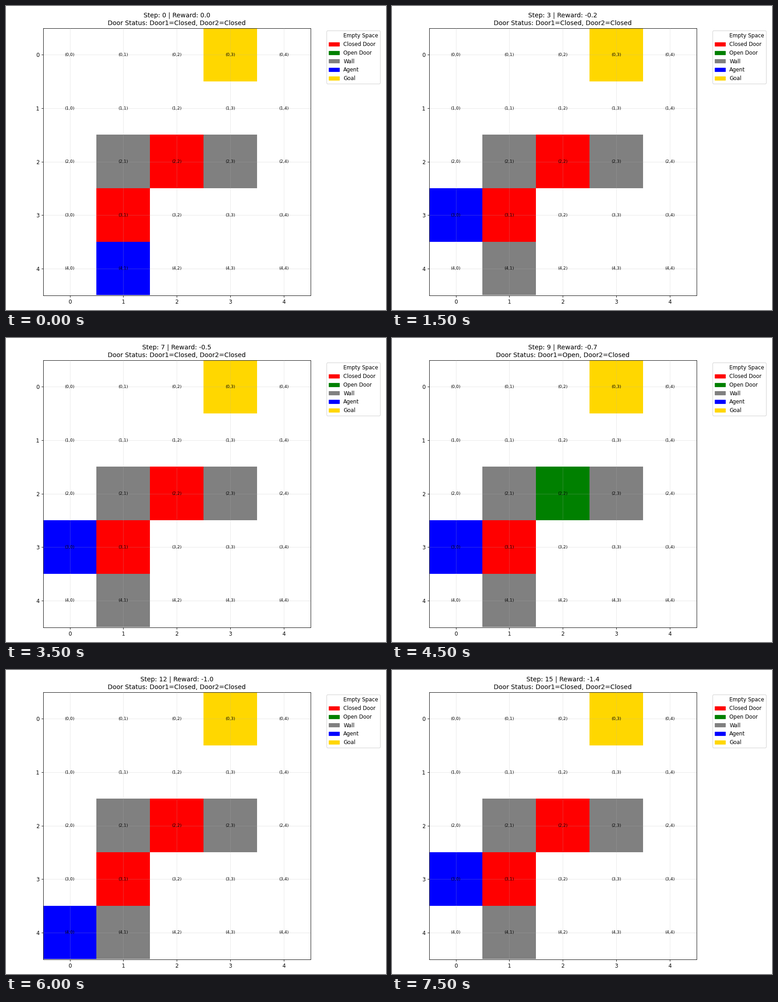
Animation, 837 px wide and 669 px high, one loop 8 s. Source, as a matplotlib script:

```python
import matplotlib.pyplot as plt
from matplotlib.animation import FuncAnimation
from matplotlib.patches import Patch, Rectangle
from matplotlib.transforms import IdentityTransform

W, H, DPI = 837, 669, 83.7
N = 5
COL_EDGES = [82, 199, 317, 435, 553, 671]
ROW_EDGES = [48, 166, 283, 401, 519, 636]

WALLS = {(2, 1), (2, 3), (4, 1)}
GOAL = (0, 3)
DOOR1, DOOR2 = (2, 2), (3, 1)

# One entry per step
PATH = ([(4, 1), (3, 1)] + [(3, 0)] * 4 + [(4, 0), (3, 0), (2, 0), (3, 0)]
        + [(4, 0)] * 3 + [(3, 0)] * 3)
REWARDS = [0.0, -0.1, -0.2, -0.2, -0.3, -0.3, -0.4, -0.5,
           -0.6, -0.7, -0.8, -0.9, -1.0, -1.1, -1.2, -1.4]
DOOR1_OPEN = {5, 8, 9, 11}
DOOR2_OPEN = {1, 2, 10, 13}

LEGEND = [("white", "Empty Space"), ("red", "Closed Door"),
          ("green", "Open Door"), ("gray", "Wall"),
          ("blue", "Agent"), ("gold", "Goal")]

# The tiny surplus keeps the pixel size from rounding down
fig = plt.figure(figsize=(10.0001, 7.9931), dpi=DPI, facecolor="white")
ax = fig.add_axes([81.65 / W, 32.4 / H, 589 / W, 588 / H])
ax.set(xlim=(-0.5, N - 0.5), ylim=(N - 0.5, -0.5),
       xticks=range(N), yticks=range(N))
ax.grid(True, alpha=0.3)
ax.set_axisbelow(False)

cells = {}
for r in range(N):
    for c in range(N):
        x, y = COL_EDGES[c], H - ROW_EDGES[r + 1]
        w = COL_EDGES[c + 1] - x
        h = ROW_EDGES[r + 1] - ROW_EDGES[r]
        cells[r, c] = Rectangle((x, y), w, h, lw=0, zorder=0.5,
                                transform=IdentityTransform())
        ax.add_artist(cells[r, c])
        ax.text(c, r, f"({r},{c})", ha="center", va="center",
                fontsize=8, zorder=4)

ax.legend(handles=[Patch(color=col, label=name) for col, name in LEGEND],
          bbox_to_anchor=(1.05, 1), loc="upper left")
title = ax.set_title("")


def cell_color(cell, step):
    if cell == PATH[step]:
        return "blue"
    if cell == DOOR1:
        return "green" if step in DOOR1_OPEN else "red"
    if cell == DOOR2:
        return "green" if step in DOOR2_OPEN else "red"
    if cell == GOAL:
        return "gold"
    return "gray" if cell in WALLS else "white"


def status(is_open):
    return "Open" if is_open else "Closed"


def update(step):
    for cell, rect in cells.items():
        rect.set_facecolor(cell_color(cell, step))
    title.set_text(f"Step: {step} | Reward: {REWARDS[step]:.1f}\n"
                   f"Door Status: Door1={status(step in DOOR1_OPEN)}, "
                   f"Door2={status(step in DOOR2_OPEN)}")
    return [title, *cells.values()]


anim = FuncAnimation(fig, update, frames=len(PATH), interval=500,
                     repeat=True, repeat_delay=0, blit=False)
plt.show()
```
